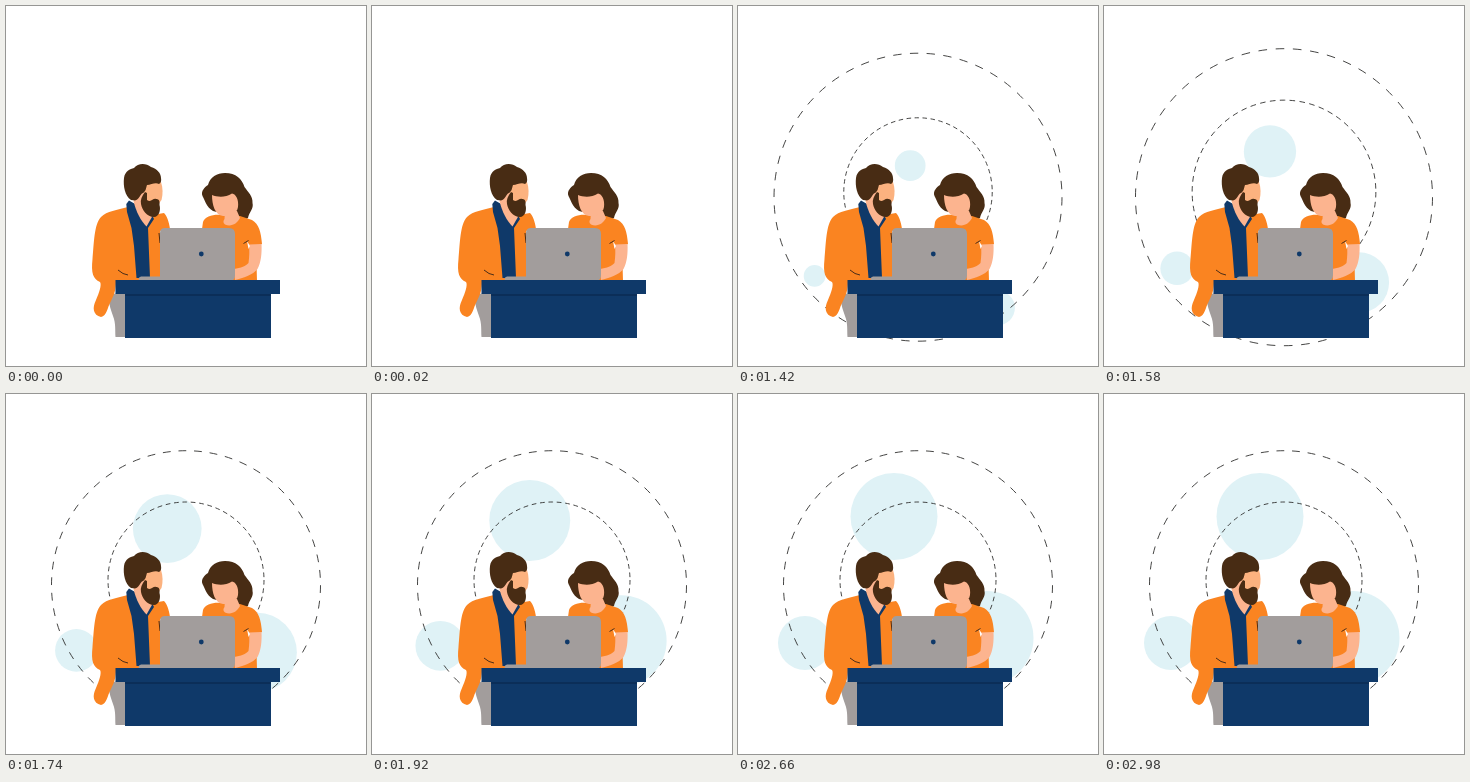
Animation, 360 px wide and 360 px high, one loop 3000 ms. Source, as an HTML page with a canvas:

```html
<!DOCTYPE html>
<html lang="en">
<head>
<meta charset="utf-8">
<title>Team at a desk</title>
<style>
  html, body { margin: 0; width: 100%; height: 100%; overflow: hidden; background: #fff; }
  canvas { display: block; width: 360px; height: 360px; }
</style>
</head>
<body>
<canvas id="stage"></canvas>
<script>
const LOOP = 3000;
const canvas = document.getElementById('stage');
const ctx = canvas.getContext('2d');
const ratio = window.devicePixelRatio || 1;
canvas.width = canvas.height = 360 * ratio;

const ORANGE = '#fa8421', NAVY = '#0f3969', HAIR = '#482c14', SKIN = '#fcb48f',
      TAN = '#fcb27f', GRAY = '#a29d9c', PALE = '#dff2f6', INK = '#30302f';

const clamp = v => Math.max(0, Math.min(1, v));
const mix = (a, b, p) => a + (b - a) * p;
const progress = (t, start, length) => clamp((t - start) / length);
const easeOut = p => 1 - (1 - p) ** 2;
const easeInOut = p => (1 - Math.cos(Math.PI * p)) / 2;

// Each bubble drifts from its birth point to its resting place as it grows.
const bubbles = [
  { from: [181, 180], to: [156, 122.5], r: 43.5, start: 1240, length: 925 },
  { from: [83, 284], to: [67, 249], r: 27, start: 1190, length: 1020 },
  { from: [266, 336], to: [248.5, 244], r: 47, start: 1255, length: 805 }
];

const rings = [
  { y: 191.2, r: 134.5, start: 1140, peak: 1522, end: 1660, over: 1.17, dashes: 54, fill: 0.5 },
  { y: 186, r: 78, start: 1200, peak: 1570, end: 1720, over: 1.18, dashes: 58, fill: 0.56 }
];

function popScale(t, ring) {
  if (t < ring.peak) {
    return ring.over * Math.sin(Math.PI / 2 * progress(t, ring.start, ring.peak - ring.start));
  }
  return mix(ring.over, 1, easeInOut(progress(t, ring.peak, ring.end - ring.peak)));
}

function disc(x, y, r, color) {
  ctx.fillStyle = color;
  ctx.beginPath();
  ctx.arc(x, y, r, 0, Math.PI * 2);
  ctx.fill();
}

function drawBubble(t, b) {
  const p = easeOut(progress(t, b.start, b.length));
  if (p > 0) disc(mix(b.from[0], b.to[0], p), mix(b.from[1], b.to[1], p), b.r * p, PALE);
}

function drawRing(t, ring) {
  const r = ring.r * popScale(t, ring);
  if (r <= 0) return;
  const step = 2 * Math.PI * r / ring.dashes;
  ctx.strokeStyle = INK;
  ctx.lineWidth = 0.9;
  ctx.setLineDash([step * ring.fill, step * (1 - ring.fill)]);
  ctx.beginPath();
  ctx.arc(180, ring.y, r, 0, Math.PI * 2);
  ctx.stroke();
  ctx.setLineDash([]);
}

const shape = (color, d) => ({ color, path: new Path2D(d) });
const crease = d => ({ line: true, color: '#4a2d18', path: new Path2D(d) });

const man = [
  shape(GRAY, 'M104 288 L120 287 L120 331 L109.5 331 C109 325 110 317 107 310 C105 304 103 299 103 294 Z'),
  shape(ORANGE, 'M122 201 C111 204 101 205 95 211 C88 218 88 238 86.5 253 C85 267 87 273 94 276 C96 279 93 287 90 294 C86 302 87 309 95 311 C101 310 101 302 105 295 C108 289 110 284 110 275 L156 275 L154 225 L164 223 C163 216 161 210 158 207 L146 209 Z'),
  shape(NAVY, 'M123 194.5 L120.3 198 L121 206 L125.5 222 L128 240 L130.5 272 L144 272 L142 222 L148 213 L145 207 Z'),
  shape(SKIN, 'M128 193 L139 183 L146.5 210 L140.5 220.5 C135 215 130 206 127.5 195 Z'),
  shape(TAN, 'M138 178 L155 176 C157 182 157 188 155.5 194 L151 200 L139 198 Z'),
  shape(HAIR, 'M125 194 C119 190 117 180 118 172 C119 165 124 163 128 162 C132 157 140 157 145 161 C151 163 155 167 155 172 C155.5 175 155 177 153 178 C149 176 145 179 141 179 C140 182 140 185 137 187 C134 188 133 194 129 194.5 Z'),
  shape(HAIR, 'M139 186 L141 187 L141 194 C145 197 147 192 150 193 C153 193 154 195 153.5 199 C155 204 153 211 148 211 C141 211 136 204 135 198 C134 194 136 190 139 186 Z'),
  crease('M153 227 L154 237'),
  crease('M112 264 L117 267.5 L122 269')
];

const woman = [
  shape(HAIR, 'M207 205 C200 201 199 194 196.5 190 C194.5 185 199 181 202 179 C204 171 211 167 219 167 C230 167 236 173 238.5 181 C242 186 247 190 246.5 197 C248 203 243 206 242 212 C238 215 233 214 229 211 Z'),
  shape(ORANGE, 'M216 209 C208 208 199 210 197 216 L196 223 L220 275 L251 275 L250 240 L256 238 C255 226 253 218 246 214 L234 210 Z'),
  shape(SKIN, 'M219 204 L231 205 L234 212 C231 218 225 221 219 218.5 C217 217 217 215 218.5 213 Z'),
  shape(SKIN, 'M206 189 C211 191 219 192 226 187.5 C230 188 233 194 232 201 C231 208 224 210 217 210 C209 209 206 199 206 189 Z'),
  shape(SKIN, 'M243 238.5 L255.5 238 C256 247 255 257 251.5 263 C247 269 237 272 229 274 L228 263 C235 262 240 260 242.5 257 C243.5 250 243.5 244 243 238.5 Z'),
  shape('#fff', 'M241 235 L244 240 L242.5 243 Z'),
  crease('M237.5 237.5 L242.5 234.5')
];

const desk = [
  shape(GRAY, 'M135 270.5 H158 V275.5 H135 Q132.5 275 132.5 273 Q132.5 271 135 270.5 Z'),
  shape(GRAY, 'M159 222 H223 Q229 222 229 228 V269 Q229 275 223 275 H154 V227 Q154 222 159 222 Z'),
  shape(NAVY, 'M119 287 H265 V332 H119 Z'),
  shape('#0b2e58', 'M119 288 H265 V290 H119 Z'),
  shape(NAVY, 'M109.5 274 H274 V288 H109.5 Z')
];

const scene = [...woman, ...man, ...desk];

function drawShape(s) {
  if (s.line) {
    ctx.strokeStyle = s.color;
    ctx.lineWidth = 1;
    ctx.stroke(s.path);
  } else {
    ctx.fillStyle = s.color;
    ctx.fill(s.path);
  }
}

function draw(t) {
  ctx.setTransform(ratio, 0, 0, ratio, 0, 0);
  ctx.fillStyle = '#fff';
  ctx.fillRect(0, 0, 360, 360);
  bubbles.forEach(b => drawBubble(t, b));
  rings.forEach(r => drawRing(t, r));
  scene.forEach(drawShape);
  disc(195.3, 248, 2.4, NAVY);
}

const begin = performance.now();
function tick() {
  draw((performance.now() - begin) % LOOP);
  requestAnimationFrame(tick);
}
tick();
</script>
</body>
</html>
```
